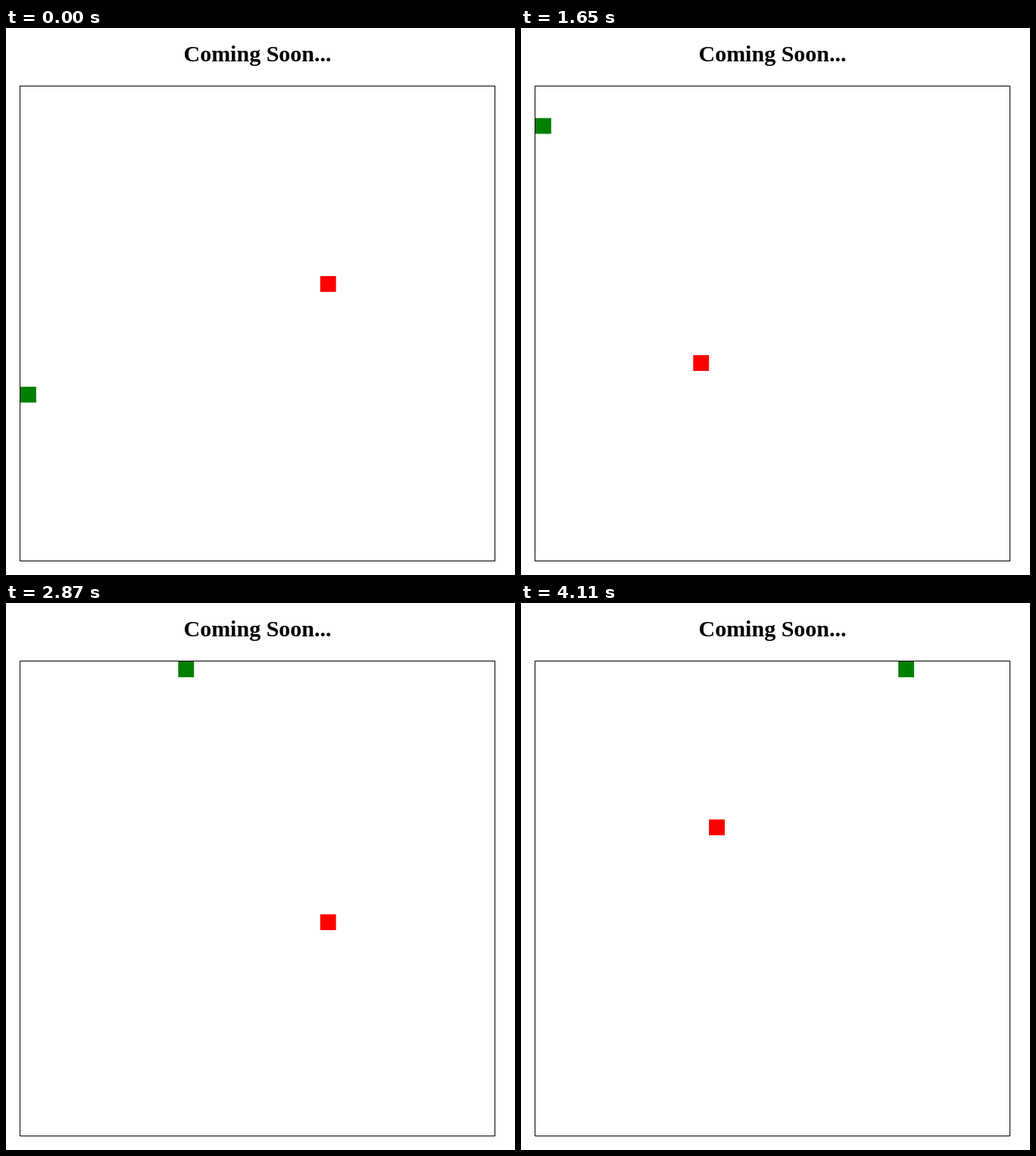
These frames come from a looping animation (672x721 px, 4.19 s). An HTML page:

```html
<!DOCTYPE html>
<html lang="en">
<head>
<meta charset="utf-8">
<title>Coming Soon</title>
<style>
  html, body { margin: 0; width: 100%; height: 100%; overflow: hidden; background: #fff; }
  svg { display: block; }
  text { font: bold 30px "Liberation Serif", "Times New Roman", serif; }
</style>
</head>
<body>
<svg width="672" height="721" viewBox="0 0 672 721">
  <text x="332" y="44" text-anchor="middle">Coming Soon...</text>
  <rect x="18.5" y="76.5" width="627" height="626" fill="none" stroke="#000"/>
  <rect id="walker" fill="green"/>
  <rect id="patrol" fill="red"/>
</svg>
<script>
const LOOP = 4190, STEPS = 42;
const CELL = 625 / 30, LEFT = 19, TOP = 77;
const NEAR = 10, FAR = 19;

// Seven steps per beat; the last beat starts late and has its own rhythm.
const BEAT = [0, 80, 160, 310, 390, 460, 540];
const LAST_BEAT = [0, 70, 150, 300, 380, 450, 530];

function stepTime(step) {
  const beat = Math.floor((step - 1) / 7), part = (step - 1) % 7;
  return beat < 5 ? 110 + beat * 690 + BEAT[part] : 3580 + LAST_BEAT[part];
}

// The checks fall through, so three corners are cut diagonally.
function patrolStep([x, y]) {
  const startedAtTop = y === NEAR && x > NEAR;
  if (x === NEAR && y < FAR) y++;
  if (y === FAR && x < FAR) x++;
  if (x === FAR && y > NEAR) y--;
  if (y === NEAR && x > NEAR && (startedAtTop || x === FAR)) x--;
  return [x, y];
}

// Up the left wall, then along the top.
const walkerAt = step => [Math.max(0, step - 19), Math.max(0, 19 - step)];

const patrolPath = [[19, 12]];
const times = [0];
for (let step = 1; step <= STEPS; step++) {
  patrolPath.push(patrolStep(patrolPath[step - 1]));
  times.push(stepTime(step));
}

const walker = document.getElementById("walker");
const patrol = document.getElementById("patrol");
for (const square of [walker, patrol]) {
  square.setAttribute("width", CELL);
  square.setAttribute("height", CELL);
}

function place(square, [col, row]) {
  square.setAttribute("x", LEFT + col * CELL);
  square.setAttribute("y", TOP + row * CELL);
}

function draw(now) {
  const t = now % LOOP;
  const step = times.filter(time => time <= t).length - 1;
  place(walker, walkerAt(step));
  place(patrol, patrolPath[step]);
  requestAnimationFrame(draw);
}
draw(0);
</script>
</body>
</html>
```
